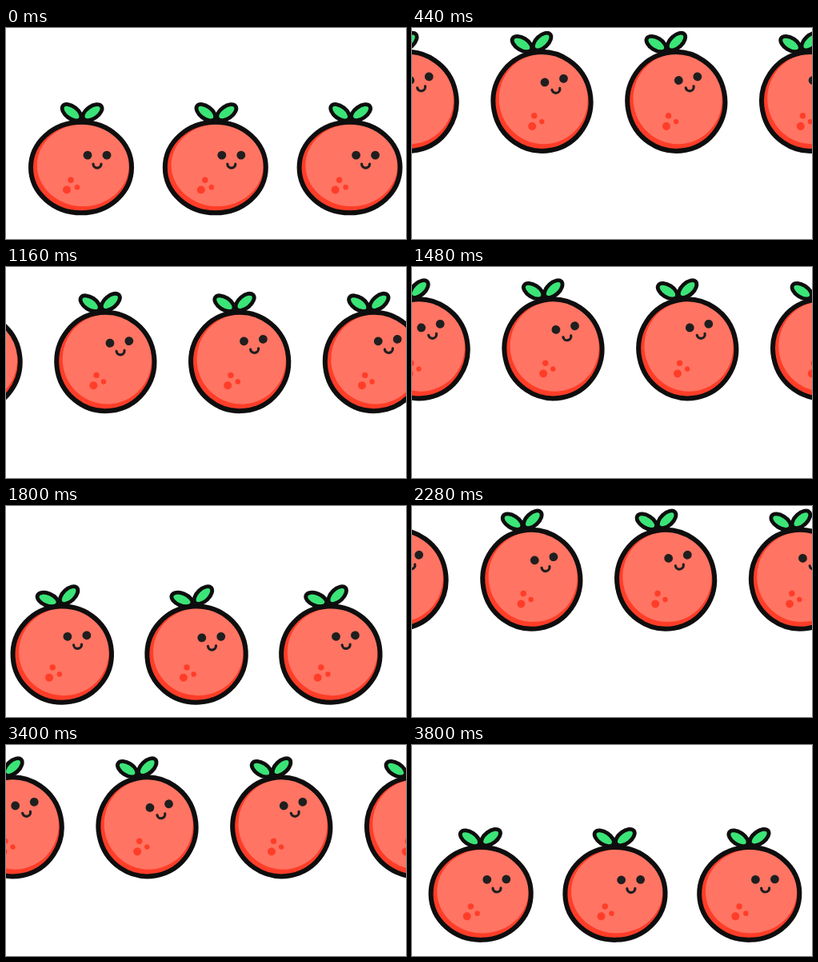
These frames come from a looping animation (500x264 px, 3840 ms). An HTML page with a canvas:

```html
<!DOCTYPE html>
<html lang="en">
<head>
<meta charset="utf-8">
<title>Bouncing fruit</title>
<style>
html, body { margin: 0; width: 100%; height: 100%; overflow: hidden; background: #fff; }
canvas { display: block; }
</style>
</head>
<body>
<canvas id="stage" width="500" height="264"></canvas>
<script>
const ctx = document.getElementById('stage').getContext('2d');
const INK = '#0e0e0e', FACE = '#1f1f1f', RED = '#ff3d28', CORAL = '#ff7463', GREEN = '#3be477';
const STEP_MS = 40, STEPS = 24, SPACING = 167.8;
const rad = deg => deg * Math.PI / 180;

// Cubic bezier (1/6, 1/6, 2/3, 1): linear start, soft landing.
function ease(u) {
  if (u >= 1) return 1;
  const curve = (s, a, b) => 3 * a * s * (1 - s) ** 2 + 3 * b * s * s * (1 - s) + s ** 3;
  let lo = 0, hi = 1;
  for (let i = 0; i < 24; i++) {
    const mid = (lo + hi) / 2;
    if (curve(mid, 1 / 6, 2 / 3) < u) lo = mid; else hi = mid;
  }
  return curve(lo, 1 / 6, 1);
}

// Steps between t and the nearest cycle point "origin".
function distance(t, origin) {
  const d = (t - origin + STEPS) % STEPS;
  return Math.min(d, STEPS - d);
}

function keyed(t, keys) {
  const i = keys.findIndex(k => k[0] >= t);
  if (i < 1) return keys[0][1];
  const [t0, v0] = keys[i - 1], [t1, v1] = keys[i];
  return v0 + (v1 - v0) * (t - t0) / (t1 - t0);
}

function oval(x, y, rx, ry, fill, line) {
  ctx.beginPath();
  ctx.ellipse(x, y, rx, ry, 0, 0, 2 * Math.PI);
  if (fill) { ctx.fillStyle = fill; ctx.fill(); }
  if (line) { ctx.strokeStyle = INK; ctx.lineWidth = line; ctx.stroke(); }
}

function leaf(baseY, side, tilt, sway) {
  ctx.save();
  ctx.translate(1, baseY);
  ctx.rotate(rad(sway));
  ctx.translate(13 * side, -11.1);
  ctx.rotate(rad(tilt));
  oval(0, 0, 13.7, 7.6, GREEN, 4.8);
  ctx.restore();
}

function fruit(x, y, pose, faceLift) {
  const { stretch, turn, sway } = pose;
  const rx = 63 - 2 * stretch, ry = 56.8 + 5.2 * stretch;
  ctx.save();
  ctx.translate(x, y + 44);
  ctx.rotate(rad(turn));
  ctx.translate(0, -44);

  leaf(-ry - 1, 1, -35, sway * 0.45);
  leaf(-ry - 1, -1, 37, sway);

  oval(0, 0, rx, ry, RED);
  oval(2.3, -2.8, rx - 5.5, ry - 5.5, CORAL);
  oval(0, 0, rx, ry, null, 6);
  oval(-13, 15.7, 3.7, 3.7, RED);
  oval(-18, 28, 5, 5, RED);
  oval(-5, 24.7, 3.2, 3.2, RED);

  ctx.translate(0, -faceLift * stretch);
  oval(8, -15.4, 5.4, 5.4, FACE);
  oval(32, -15.4, 5.4, 5.4, FACE);
  ctx.beginPath();
  ctx.arc(20, -4.5, 5, 0, Math.PI);
  ctx.lineWidth = 3.2;
  ctx.strokeStyle = FACE;
  ctx.lineCap = 'round';
  ctx.stroke();
  ctx.restore();
}

function draw(now) {
  const t = Math.floor(now / STEP_MS) % STEPS;
  const pose = {
    stretch: ease(distance(t, 0) / 6),
    turn: -11.2 * ease(distance(t, 0) / 12),
    sway: keyed(t, [[0, 0], [13, 7], [20.5, -13], [23, -2], [24, 0]])
  };
  const y = 195.5 - 106 * ease(distance(t, 22) / 12) + 1.2 * (1 - pose.stretch);
  ctx.clearRect(0, 0, 500, 264);
  for (let i = -1; i < 3; i++) {
    fruit(94 + SPACING * (i + t / STEPS), y, pose, i === 0 ? 7.5 : 10);
  }
}

const start = performance.now();
function tick() {
  draw(performance.now() - start);
  requestAnimationFrame(tick);
}
tick();
</script>
</body>
</html>
```
